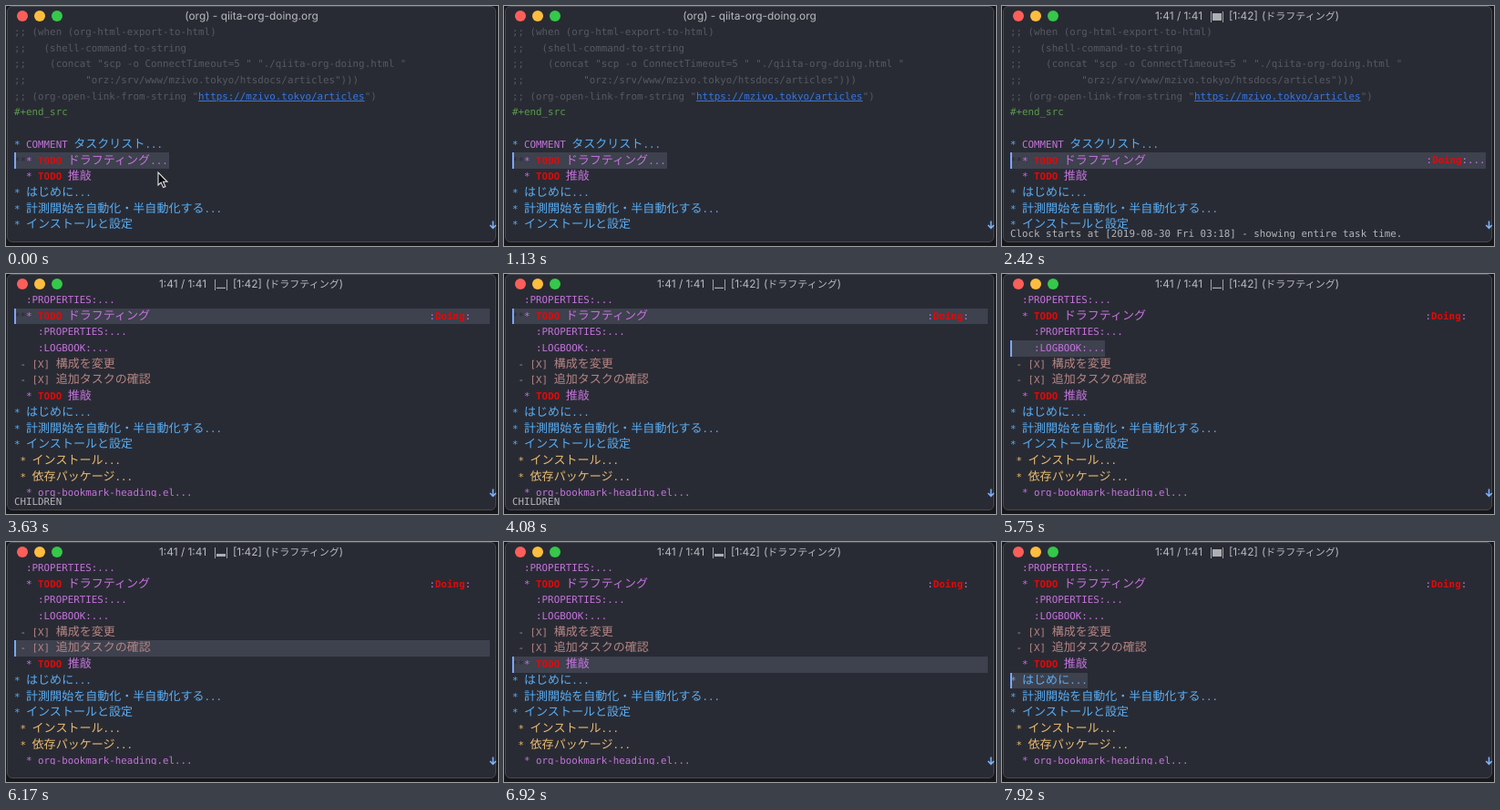
These frames come from a looping animation (540 by 264 pixels, 8000 ms). An HTML page:

```html
<!DOCTYPE html>
<html lang="ja">
<head>
<meta charset="utf-8">
<title>Org clock demo</title>
<style>
:root { --bg: #292b34; --col: 6.52px; --row: 17.68px; }
html, body { margin: 0; width: 540px; height: 264px; overflow: hidden; background: #17181c; }
body { position: relative; }
div, pre, svg { position: absolute; box-sizing: border-box; margin: 0; }
.win { left: 1px; top: 0; width: 537px; height: 260px; background: var(--bg);
  border: 1px solid #47494f; border-radius: 6px; }

/* title bar */
.light { top: 5px; width: 12px; height: 12px; border-radius: 50%; }
.title { left: 0; top: 0; width: 540px; height: 22px; font: 11.9px/22px Inter, sans-serif;
  color: #b9babe; white-space: pre; text-rendering: geometricPrecision; }
.title div { top: 0; }
.title i { font-size: 11px; }
.name { width: 539px; text-align: center; }
.bar { width: 1px; height: 12px; margin-top: 6px; background: #a2a3a8; }
.level { left: 231px; width: 10px; height: 10px; margin-top: 6px; background: #aeafb3;
  transform-origin: 0 100%; animation: level 8s step-end infinite; }

/* text */
pre, .echo { font: 10.83px/17.68px 'DejaVu Sans Mono', 'Liberation Mono', monospace;
  text-rendering: geometricPrecision; font-variant-ligatures: none; }
pre span, pre i, pre b, pre u { line-height: 0; }
i { font: normal 13.04px 'Noto Sans CJK JP', 'Noto Sans CJK', 'Noto Sans CJK SC', sans-serif; }
pre b { color: #e40808; }
.body { left: 0; top: 20px; width: 540px; height: 225px; overflow: hidden; }
pre { left: 9px; top: 0; }
.d { color: #565962; }
.d u { color: #3478e6; }
.g { color: #5b9a4c; }
.b { color: #58aef5; }
.p { color: #c473dc; }
.o { color: #e9bb70; }
.l { color: #b58583; }
.h { color: var(--bg); }
.tag { left: calc(9px + 70 * var(--col)); top: calc(8 * var(--row)); }
.echo { left: 9px; top: 242px; color: #b4b5b9; white-space: pre; }
.hl { left: 9px; height: var(--row); background: #3e414e; animation: hl 8s step-end infinite; }
.caret { left: 9px; width: 2px; height: var(--row); background: #7ba6f2;
  animation: hl 8s step-end infinite; max-width: 2px; }

/* visibility windows */
.mouse { animation: mouse 8s step-end infinite; }
.idle { animation: idle 8s step-end infinite; }
.clock { animation: clock 8s step-end infinite; }
.folded { animation: folded 8s step-end infinite; }
.open { animation: open 8s step-end infinite; }
.tag { animation: tag 8s step-end infinite; }
.started { animation: started 8s step-end infinite; }
.children { animation: children 8s step-end infinite; }
@keyframes mouse { 0% { opacity: 1 } 11.5%, 100% { opacity: 0 } }
@keyframes idle { 0% { opacity: 1 } 21.875%, 100% { opacity: 0 } }
@keyframes clock { 0% { opacity: 0 } 21.875%, 100% { opacity: 1 } }
@keyframes folded { 0% { opacity: 1 } 45.375%, 100% { opacity: 0 } }
@keyframes open { 0% { opacity: 0 } 45.375%, 100% { opacity: 1 } }
@keyframes tag { 0% { opacity: 0 } 21.875% { opacity: 1 } 45.375%, 100% { opacity: 0 } }
@keyframes started { 0% { opacity: 0 } 21.875% { opacity: 1 } 32.25%, 100% { opacity: 0 } }
@keyframes children { 0% { opacity: 0 } 45.375% { opacity: 1 } 57.875%, 100% { opacity: 0 } }
@keyframes level {
  0% { transform: scaleY(.8) }
  32.25% { transform: scaleY(.3) }
  45.375% { transform: scaleY(.12) }
  76% { transform: scaleY(.3) }
  88.5%, 100% { transform: scaleY(.8) }
}
/* current line: position and width follow the caret */
@keyframes hl {
  0% { top: calc(8 * var(--row)); width: 170px }
  21.875% { top: calc(8 * var(--row)); width: 522px }
  45.375% { top: var(--row); width: 522px }
  68.75% { top: calc(2 * var(--row)); width: 124px }
  70.5% { top: calc(3 * var(--row)); width: 104px }
  72.25% { top: calc(4 * var(--row)); width: 522px }
  74% { top: calc(5 * var(--row)); width: 522px }
  81% { top: calc(6 * var(--row)); width: 522px }
  88.5%, 100% { top: calc(7 * var(--row)); width: 85px }
}
</style>
</head>
<body>
<div class="win"></div>
<div class="light" style="left:12px;background:#fc5f5a"></div>
<div class="light" style="left:31px;background:#fdbd3f"></div>
<div class="light" style="left:50px;background:#35c84a"></div>

<div class="title idle"><div class="name">(org) - qiita-org-doing.org</div></div>
<div class="title clock">
  <div style="left:168px">1:41 / 1:41</div>
  <div class="bar" style="left:229px"></div>
  <div class="level"></div>
  <div class="bar" style="left:242px"></div>
  <div style="left:249px">[1:42]</div>
  <div style="left:285px">(<i>ドラフティング</i>)</div>
</div>

<div class="body">
<div class="hl"></div>
<pre class="folded"><span class="d">;; (when (org-html-export-to-html)
;;   (shell-command-to-string
;;    (concat "scp -o ConnectTimeout=5 " "./qiita-org-doing.html "
;;          "orz:/srv/www/mzivo.tokyo/htsdocs/articles")))
;; (org-open-link-from-string "<u>https://mzivo.tokyo/articles</u>")</span>
<span class="g">#+end_src</span>

<span class="b">* <span class="p">COMMENT</span> <i>タスクリスト</i>...</span>
<span class="p"><span class="h">**</span>* <b>TODO</b> <i>ドラフティング</i><span class="idle">...</span>
<span class="h">**</span>* <b>TODO</b> <i>推敲</i></span>
<span class="b">* <i>はじめに</i>...
* <i>計測開始を自動化・半自動化する</i>...
* <i>インストールと設定</i></span></pre>
<pre class="tag"><span class="p">:<b>Doing</b>:...</span></pre>
<pre class="open"><span class="p">  :PROPERTIES:...
<span class="h">**</span>* <b>TODO</b> <i>ドラフティング</i>                                               :<b>Doing</b>:
    :PROPERTIES:...
    :LOGBOOK:...</span>
<span class="l"> - [X] <i>構成を変更</i>
 - [X] <i>追加タスクの確認</i></span>
<span class="p"><span class="h">**</span>* <b>TODO</b> <i>推敲</i></span>
<span class="b">* <i>はじめに</i>...
* <i>計測開始を自動化・半自動化する</i>...
* <i>インストールと設定</i></span>
<span class="o"><span class="h">*</span>* <i>インストール</i>...
<span class="h">*</span>* <i>依存パッケージ</i>...</span>
<span class="p"><span class="h">**</span>* org-bookmark-heading.el...</span></pre>
<div class="caret"></div>
</div>

<div class="echo started">Clock starts at [2019-08-30 Fri 03:18] - showing entire task time.</div>
<div class="echo children">CHILDREN</div>

<svg style="left:530px;top:236px" width="9" height="10" fill="none" stroke="#7db2fa" stroke-width="1.6">
  <path d="M4.5 0.5V8M1.2 5L4.5 8.4L7.8 5"/>
</svg>
<svg class="mouse" style="left:165px;top:181px" width="16" height="22">
  <path d="M2 2V16L5.2 13.1L7.6 18.6L9.9 17.6L7.5 12.3H12Z" fill="#0b0b0d" stroke="#e6e6e8" stroke-width="1.1"/>
</svg>
</body>
</html>
```
